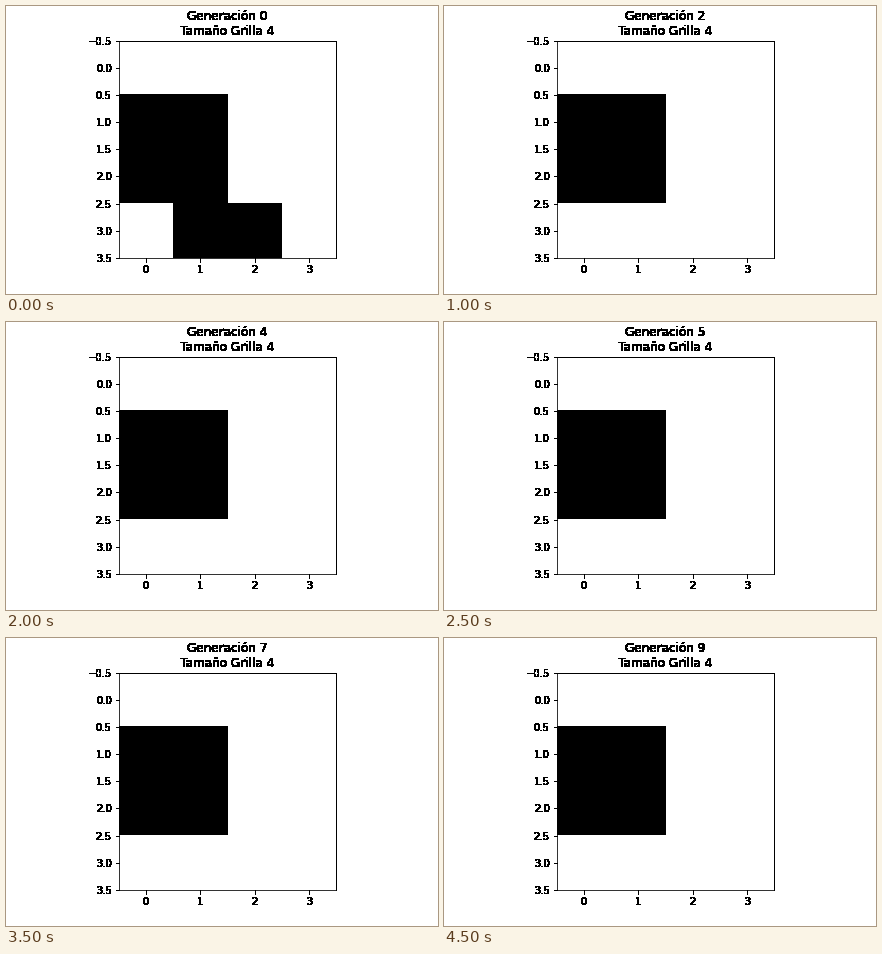
Write a matplotlib script that moves like this. It is 432x288 px and loops after 5000 ms.

```python
import numpy as np
import matplotlib.pyplot as plt
from matplotlib.animation import FuncAnimation

SIZE = 4
GENERATIONS = 10
INTERVAL = 500

plt.rcParams.update({"font.family": "DejaVu Sans", "font.size": 10})


def first_grid():
    grid = np.zeros((SIZE, SIZE), int)
    grid[1:3, 0:2] = 1
    grid[3, 1:3] = 1
    return grid


def step(grid):
    """A live cell stays alive with at least three live neighbours."""
    padded = np.pad(grid, 1)
    around = sum(padded[r:r + SIZE, c:c + SIZE]
                 for r in range(3) for c in range(3)) - grid
    return grid * (around >= 3)


def hard_edges(img, dpi):
    """Turn every touched pixel solid black, without antialiasing."""
    solid = np.zeros_like(img)
    solid[..., 3] = img[..., 3] > 0
    return solid, 0, 0


history = [first_grid()]
while len(history) < GENERATIONS:
    history.append(step(history[-1]))

fig, ax = plt.subplots(figsize=(6, 4), dpi=72, facecolor="white")
fig.subplots_adjust(left=0.125, right=0.9, bottom=0.125, top=0.88)
image = ax.imshow(history[0], cmap="binary", vmin=0, vmax=1,
                  interpolation="nearest")
ax.set_xticks(np.arange(SIZE))
ax.set_yticks(np.arange(-0.5, SIZE, 0.5))
title = ax.set_title("", fontsize=12)

crisp = [title, ax.spines["top"], ax.spines["right"]]
for axis in (ax.xaxis, ax.yaxis):
    for tick in axis.get_major_ticks():
        crisp += [tick.tick1line, tick.label1]
for artist in crisp:
    artist.set_agg_filter(hard_edges)


def draw(n):
    image.set_data(history[n])
    title.set_text(f"Generación {n}\nTamaño Grilla {SIZE}")
    return image, title


anim = FuncAnimation(fig, draw, frames=GENERATIONS, interval=INTERVAL,
                     init_func=lambda: draw(0), repeat=True, repeat_delay=0)
plt.show()
```
